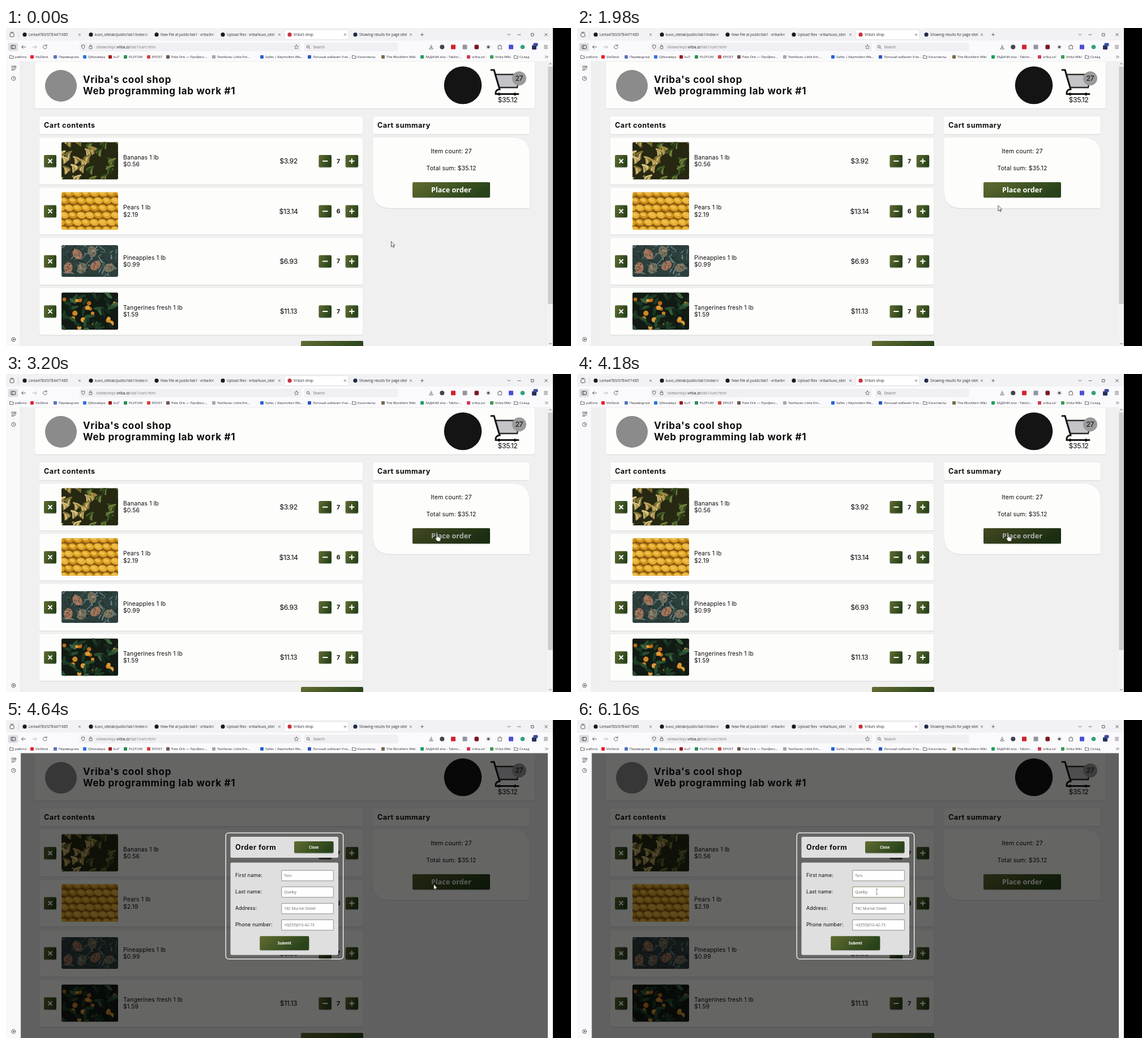
An HTML page for the animation above (8.28 s loop, 998 by 561 pixels).

```html
<!DOCTYPE html>
<html lang="en">
<head>
<meta charset="utf-8">
<title>Shop cart</title>
<style>
  html, body { margin: 0; width: 100%; height: 100%; overflow: hidden; background: #000; }
  svg { display: block; width: 100vw; height: 100vh; }
  text { fill: #0c0c0c; white-space: pre; }
  .m { font-family: Inter, sans-serif; font-size: 10.4px; letter-spacing: .015em; }
  .n { font-family: Inter, sans-serif; font-size: 12.3px; letter-spacing: -.035em; }
  .b { font-family: Inter, sans-serif; font-size: 12.6px; font-weight: 700; letter-spacing: .04em; }
  .u { font-family: "Open Sans", "Noto Sans", sans-serif; font-size: 6.2px; fill: #2b2a33; }
  .k { font-family: "Open Sans", "Noto Sans", sans-serif; font-weight: 700; fill: #fff; }
  .c { text-anchor: middle; }
</style>
</head>
<body>
<svg id="stage" viewBox="0 0 998 561" xmlns="http://www.w3.org/2000/svg"></svg>
<script>
const LOOP = 8280, OPEN_AT = 4200, HOVER_AT = 2200;

let seed = 11;
const rnd = (a = 0, b = 1) => {
  seed = (seed * 16807) % 2147483647;
  return a + (b - a) * seed / 2147483647;
};
const pick = list => list[Math.floor(rnd(0, list.length))];
const times = (n, f) => Array.from({ length: n }, (_, i) => f(i)).join('');

const rect = (x, y, w, h, fill, r = 0, more = '') =>
  `<rect x="${x}" y="${y}" width="${w}" height="${h}" rx="${r}" fill="${fill}" ${more}/>`;
const dot = (x, y, r, fill) => `<circle cx="${x}" cy="${y}" r="${r}" fill="${fill}"/>`;
const ring = (x, y, r, w = .8, more = '') =>
  `<circle cx="${x}" cy="${y}" r="${r}" fill="none" stroke="#444" stroke-width="${w}" ${more}/>`;
const oval = (x, y, rx, ry, fill, turn = 0) =>
  `<ellipse rx="${rx}" ry="${ry}" fill="${fill}" transform="translate(${x} ${y}) rotate(${turn})"/>`;
const line = (d, color = '#444', w = .8, fill = 'none') =>
  `<path d="${d}" fill="${fill}" stroke="${color}" stroke-width="${w}" stroke-linecap="round"/>`;
const text = (x, y, s, cls, style = '') => `<text x="${x}" y="${y}" class="${cls}" style="${style}">${s}</text>`;
const card = (x, y, w, h) =>
  rect(x, y + 1, w, h, '#d6d6da', 3) + rect(x, y, w, h, '#fdfdfc', 3, 'stroke="#e8e8e4" stroke-width=".6"');
const button = (x, y, w, h) => rect(x, y + 1.2, w, h, '#00000038', 2) + rect(x, y, w, h, 'url(#olive)', 2);
const cross = (x, y, r, color, w) => line(`M${x - r} ${y - r}l${2 * r} ${2 * r}m0 ${-2 * r}l${-2 * r} ${2 * r}`, color, w);

// Product pictures, drawn in a 100 px wide box
const photos = {
  // Bunches fan out from a stem; ripe on the left, green on the right
  bananas: () => rect(0, 0, 100, 66, '#262812') + times(30, i => {
    const x = (i % 6) * 19 + rnd(-6, 6), y = Math.floor(i / 6) * 15 + rnd(-7, 3), side = pick([-1, 1]);
    const colors = x < 54 ? ['#c4a65a', '#a48943', '#776d30', '#d9c385'] : ['#486328', '#34491f', '#76803c', '#263818'];
    return times(5, k => line(`M${x} ${y}q${side * (3 + k * 2)} ${1 + k * .3} ${side * (3 + k * 2.2)} ${13 - k * 1.8}`, pick(colors), 2.5));
  }),
  pears: () => rect(0, 0, 100, 66, '#8a5a14') + times(6, r => times(8, i => {
    const x = i * 15 + (r % 2) * 7 - 2, y = r * 12.8 + 2;
    return oval(x, y, 8, 5.7, pick(['#dea11f', '#e5ae31', '#cf9019']), 14) + oval(x - 1, y - 1, 5, 3, '#edbf4a', 14);
  })),
  pineapples: () => rect(0, 0, 100, 56, '#2d3f3c') + times(100, () =>
    line(`M${rnd(0, 100)} ${rnd(0, 56)}l${rnd(-10, 10)} ${rnd(-12, 6)}`, pick(['#5f7c80', '#466258', '#1b2b27', '#7a8f98', '#22332c']), 1.6)
  ) + [[28, 16], [54, 11], [12, 40], [36, 41], [60, 36], [84, 40]].map(([x, y], i) =>
    oval(x, y, 7.5, 10, i % 2 ? '#747260' : '#a07258', i * 23 - 40) +
    times(14, () => dot(x + rnd(-5, 5), y + rnd(-7, 7), 1.1, pick(['#4f4a40', '#b09078'])))).join(''),
  tangerines: () => rect(0, 0, 100, 66, '#111a13') +
    times(18, () => dot(rnd(4, 96), rnd(5, 62), rnd(3, 5), pick(['#d18524', '#b96a18', '#dd9a38']))) +
    times(38, () => oval(rnd(0, 100), rnd(0, 66), rnd(6, 10), 2.8, pick(['#1c3a24', '#284e30', '#15291b', '#3c6040']), rnd(0, 180)))
};
const photo = (name, y, h) => `<clipPath id="${name}"><rect width="100" height="${h}" rx="3"/></clipPath>
  <g transform="translate(98 ${y})"><g clip-path="url(#${name})">${photos[name]()}</g></g>`;

const row = ([name, picture, unit, sum, count, h], i) => {
  const c = 234.8 + i * 88.4;
  return card(58.5, c - 41.6, 572, 83) + photo(picture, c - h / 2 - .5, h) +
    button(67, c - 10.8, 22, 21.6) + cross(78, c, 2.9, '#fff', 2) +
    text(207, c - 3, name, 'm') + text(207, c + 9.4, unit, 'm') +
    text(499, c + 4.4, sum, 'n c') +
    button(552.5, c - 10.8, 22.5, 21.6) + line(`M560 ${c}h7.6`, '#fff', 2) +
    text(587.3, c + 3.8, count, 'b c', 'font-size:10.4px') +
    button(599.7, c - 10.8, 22.5, 21.6) + line(`M607 ${c}h7.6m-3.8 -3.8v7.6`, '#fff', 2);
};

const shop = () => rect(26, 58, 931, 503, '#f0f0f0') +
  card(51, 59, 883, 83) + dot(97, 102, 28, '#8b8b8b') +
  text(136, 96.8, "Vriba's cool shop", 'b', 'font-size:17px') +
  text(136, 117.3, 'Web programming lab work #1', 'b', 'font-size:17px') +
  dot(807, 101, 33.3, '#141414') +
  line('M864 82H908L903 105H871Z', '#2a2a2a', 2.4, '#c4c4c8') +
  line('M857 74H862L872 108Q864 109 865 116.5H905', '#161616', 3) +
  dot(871, 116.5, 2.6, '#161616') + dot(899, 116.5, 2.6, '#161616') +
  dot(906.5, 89, 12.5, '#9a9a9a') + text(906.3, 93.3, '27', 'n c') + text(886, 131, '$35.12', 'n c') +
  card(58.5, 155.5, 572, 32) + text(67, 176.3, 'Cart contents', 'b') +
  card(648, 155.5, 277, 32) + text(656, 176.3, 'Cart summary', 'b') +
  [['Bananas 1 lb', 'bananas', '$0.56', '$3.92', 7, 66],
   ['Pears 1 lb', 'pears', '$2.19', '$13.14', 6, 66],
   ['Pineapples 1 lb', 'pineapples', '$0.99', '$6.93', 7, 56],
   ['Tangerines fresh 1 lb', 'tangerines', '$1.59', '$11.13', 7, 66]].map(row).join('') +
  `<path d="M648 194H893Q925 194 925 226V319H680Q648 319 648 287Z" fill="#d6d6da"/>
   <path d="M648 193H893Q925 193 925 225V318H680Q648 318 648 286Z" fill="#fdfdfc" stroke="#e8e8e4" stroke-width=".6"/>` +
  text(786.5, 220.7, 'Item count: 27', 'm c') + text(786.5, 251.3, 'Total sum: $35.12', 'm c') +
  button(718, 272, 137, 27) + text(786.5, 290.4, 'Place order', 'k c', 'font-size:12.6px') +
  rect(718, 272, 137, 27.4, '#000', 2, 'id="shade"') +
  button(521, 552, 110, 27);

const field = ([label, hint], i) => {
  const y = 265.3 + i * 29.05;
  return text(405, y + 11.8, label, 'm', 'font-size:8.9px') +
    rect(486.8, y, 91.5, 18.4, '#fff', .5, `id="field${i}" stroke="#77777c" stroke-width=".8"`) +
    text(491.3, y + 11.5, hint, 'u', 'font-size:6.6px;fill:#626266');
};
const dialog = () => rect(26, 58, 931, 503, '#000', 0, 'opacity=".6"') +
  rect(957, 58, 9, 503, '#fbfbfc') +
  rect(388.2, 199.2, 207.4, 222.4, 'none', 5, 'stroke="#fff" stroke-width="1.3"') +
  rect(396.5, 206, 190.5, 37, '#dfdfdf', 2.5) + text(405, 228.7, 'Order form', 'b') +
  button(509, 214, 69.5, 20.5) + text(543.8, 227, 'Close', 'k c', 'font-size:6.6px') +
  rect(396.5, 251.5, 190.5, 163, '#dfdfdf', 2.5) +
  [['First name:', 'Torv'], ['Last name:', 'Quelby'], ['Address:', '74C Murnel Street'],
   ['Phone number:', '+0(555)010-42-73']].map(field).join('') +
  button(448.3, 381.3, 87, 24.7) + text(491.8, 396.2, 'Submit', 'k c', 'font-size:6.8px');

const tab = ([x, title, color, closeX]) =>
  dot(x, 11.7, 3.6, color) + text(x + 7, 14, title, 'u') + cross(closeX, 11.7, 1.7, '#444', .7);
const mark = ([x, name, color]) => (color
  ? rect(x - 3, 48, 6, 6, color, 1)
  : line(`M${x - 3} 48.5h2.3l.8 1h3v4.2h-6.1z`)) + text(x + 6, 53.2, name, 'u', 'font-size:6px');

const tabBar = () => rect(0, 0, 966, 22, '#f2f2f5') +
  rect(492, 3, 113, 17.5, '#fff', 2.5, 'stroke="#d5d5da" stroke-width=".6"') +
  rect(7, 9, 7, 6.5, 'none', 1.5, 'stroke="#444" stroke-width=".9"') + line('M8 7.4h5') + line('M22 6v12', '#ccc', .6) +
  [[33, 'Lerka4783/SITE4471K85', '#1c1c20', 130], [150, 'kuvo_sitelab/public/lab1/index', '#1c1c20', 248],
   [266, 'New File at public/lab1 · vriba/k', '#1c1c20', 365], [383, 'Upload files · vriba/kuvo_sitel', '#1c1c20', 483],
   [501, "Vriba's shop", '#c8323c', 599], [617, 'Showing results for page sitel', '#232b4a', 715]].map(tab).join('') +
  line('M732.5 11.7h5m-2.5 -2.5v5M886 10.5l2.5 2.5l2.5 -2.5M904 11.8h5') +
  rect(927.5, 9.5, 4.6, 4.6, 'none', .5, 'stroke="#333" stroke-width=".8"') + cross(954, 11.7, 2.3, '#333', .8);

const toolbar = () => rect(0, 22, 966, 36.5, '#fafafc') +
  rect(4, 26.5, 17, 14, '#dcdce1', 2) + rect(9, 30.5, 7.5, 6, 'none', 1, 'stroke="#333" stroke-width=".9"') + line('M11.5 31v5') +
  line('M34.5 33.5h-7m3 -3l-3 3l3 3') + line('M47 33.5h7m-3 -3l3 3l-3 3', '#aaa') +
  line('M71.5 31.2a3.4 3.4 0 1 0 .7 3M72 29.2v2.4h-2.4') +
  rect(130, 26, 391, 15, '#f0f0f4', 2) + rect(527, 26, 165.5, 15, '#f0f0f4', 2) +
  line('M133.5 30.8l2.8 -1l2.8 1q0 4.5 -2.8 6.2q-2.8 -1.7 -2.8 -6.2z') +
  rect(147, 32.6, 5, 4, 'none', .8, 'stroke="#444" stroke-width=".8"') + line('M148 32.5v-1.2a1.5 1.5 0 0 1 3 0v1.2') +
  text(159.5, 35.8, 'siteworkqo.<tspan fill="#15141a">vriba.zz</tspan>/lab1/cart.html', 'u', 'font-size:6.6px;fill:#77777f') +
  line('M513 29.5l1.1 2.5l2.7 .3l-2 1.9l.6 2.7l-2.4 -1.4l-2.4 1.4l.6 -2.7l-2 -1.9l2.7 -.3z', '#555', .7) +
  ring(533.5, 33, 2.2) + line('M535.2 34.7l1.8 1.8') +
  text(542.5, 35.8, 'Search', 'u', 'font-size:6.5px;fill:#6a6a72') +
  line('M751 30v5m-2 -2l2 2l2 -2M748 35.5v1.5h6v-1.5') +
  dot(770.3, 33.5, 4, '#44444c') + rect(786, 29.5, 8, 8, '#d3222c', 1) + rect(806.5, 29.5, 8, 8, '#8f969e', 1) +
  rect(827.5, 29.5, 7.5, 8, '#7b1620', 2) + dot(852, 33.5, 2.3, '#555') +
  ring(852, 33.5, 3.7, 1, 'stroke-dasharray=".7 2.2"') +
  line('M869.5 31.5h2v-1.5h2v1.5h2v5.5h-6z') +
  rect(888, 29.5, 8, 8, '#4b4fd0', 1) + dot(912.5, 33.5, 3.8, '#2fa37b') + rect(929, 30.5, 8, 7.5, '#26305c', 1) +
  rect(931.5, 26.5, 8, 5.5, '#3d4a9c', 1.5) + line('M950.5 30.8h6m-6 2.6h6m-6 2.6h6');

const bookmarks = () =>
  [[10, 'работа'], [46, 'VioDeck', '#e8202a'], [87, 'Переводчик', '#5874b8'], [139, 'QNovaleya', '#2d73e0'],
   [184, 'ku7', '#a11a1a'], [211, 'PLOTUM', '#2d8f52'], [252, 'EPOST', '#d6443a'], [286, 'Pale Orb — Професс...', '#6c5a56'],
   [367, 'Textfaces: Little Em...', '#a6a6ac'], [452, 'Safes | Keymolten We...', '#2862d8'], [536, 'Личный кабинет Учи...', '#2b55c4'],
   [615, 'Конспекты'], [666, 'The Blockfern Wiki', '#7a6a4c'], [735, 'ЗАДАЧИ.xlsx - Tablor...', '#1fa05c'],
   [817, 'vriba.zz/', '#cf3a50'], [858, 'Vriba Wiki', '#3f9a56'], [901, 'Склад']].map(mark).join('') +
  line('M952.5 49l2 2l-2 2m2.8 -4l2 2l-2 2');

const sidebar = () => rect(0, 58, 26, 503, '#f9f9fb') + rect(25.6, 58, .6, 503, '#dcdce0') +
  rect(10, 67, 4, 3, 'none', .5, 'stroke="#444" stroke-width=".8"') + line('M10 72.5h7M15.5 67h2v3h-2zM10 74.5h4') +
  ring(13.3, 89, 3.6) + line('M13.3 87v2.2h1.6') +
  ring(13.3, 549.5, 3.3, 1.3, 'stroke-dasharray="1.7 .9"') + dot(13.3, 549.5, 1.2, '#444');

const scrollbar = () => rect(957, 58, 9, 503, '#f3f3f4') + rect(957.3, 68, 8.4, 419, '#cdcdcf') +
  line('M959.5 64l2 -2l2 2M959.5 556l2 2l2 -2', '#555', 1);

const cursors = () => `<g id="cursor" stroke-linejoin="round">
  <path id="arrow" d="M0 0V9.6L2.3 7.6 3.7 10.7 5.1 10.1 3.7 7.1H6.6Z" fill="#fff" stroke="#111" stroke-width=".7"/>
  <path id="hand" d="M-1 .5a1.1 1.1 0 0 1 2.2 0V4.6l4.2 1q1.4.5 1.1 2.2L5.6 12H.6L-3 7.4q.2-1.5 1.6-.7l.4.4Z" fill="#fff" stroke="#222" stroke-width=".6"/>
  <path id="beam" d="M-1.6 -4.8H1.6M0 -4.8V4.8M-1.6 4.8H1.6" fill="none" stroke="#666" stroke-width=".7"/></g>`;

const stage = document.getElementById('stage');
stage.innerHTML = `<defs><linearGradient id="olive" x2="1" y2=".35">
  <stop stop-color="#616c31"/><stop offset="1" stop-color="#28431a"/></linearGradient></defs>` +
  rect(0, 0, 998, 561, '#000') + shop() + scrollbar() + `<g id="dialog">${dialog()}</g>` +
  tabBar() + toolbar() + bookmarks() + sidebar() + rect(966, 0, 32, 561, '#000') + cursors();

const el = id => document.getElementById(id);
const shade = el('shade'), modal = el('dialog'), cursor = el('cursor'), lastName = el('field1');
const shapes = ['arrow', 'hand', 'beam'].map(el);
const show = (node, on) => node.setAttribute('visibility', on ? 'visible' : 'hidden');
const smooth = v => { v = Math.max(0, Math.min(1, v)); return v * v * (3 - 2 * v); };

// Pointer path: time, x, y
const path = [[0, 680.5, 376.5], [860, 681, 376.5], [1380, 698, 362], [1680, 726, 334], [2200, 757, 298],
  [2440, 761.3, 283], [4220, 761.3, 283], [4640, 755.5, 289.5], [5040, 735, 312], [5200, 735, 312],
  [5700, 610, 317], [6020, 541, 309], [6160, 529.5, 302.8], [LOOP, 529.5, 302.8]];
const pointer = t => {
  const i = path.findIndex(p => p[0] > t), [t0, x0, y0] = path[i - 1], [t1, x1, y1] = path[i];
  const k = (t - t0) / (t1 - t0);
  return [x0 + (x1 - x0) * k, y0 + (y1 - y0) * k];
};

function draw(t) {
  const open = t >= OPEN_AT, [x, y] = pointer(t);
  const overField = open && x > 486 && x < 579 && y > 294 && y < 314;
  const kind = overField ? 'beam' : !open && t >= HOVER_AT ? 'hand' : 'arrow';
  const hover = open ? 1 - smooth((t - OPEN_AT) / 700) : smooth((t - HOVER_AT) / 1000);
  shade.setAttribute('opacity', .32 * hover);
  show(modal, open);
  lastName.setAttribute('stroke', overField ? '#6f7040' : '#77777c');
  cursor.setAttribute('transform', `translate(${x} ${y})`);
  shapes.forEach(s => show(s, s.id === kind));
}

const start = performance.now();
function tick() {
  draw((performance.now() - start) % LOOP);
  requestAnimationFrame(tick);
}
draw(0);
requestAnimationFrame(tick);
</script>
</body>
</html>
```
